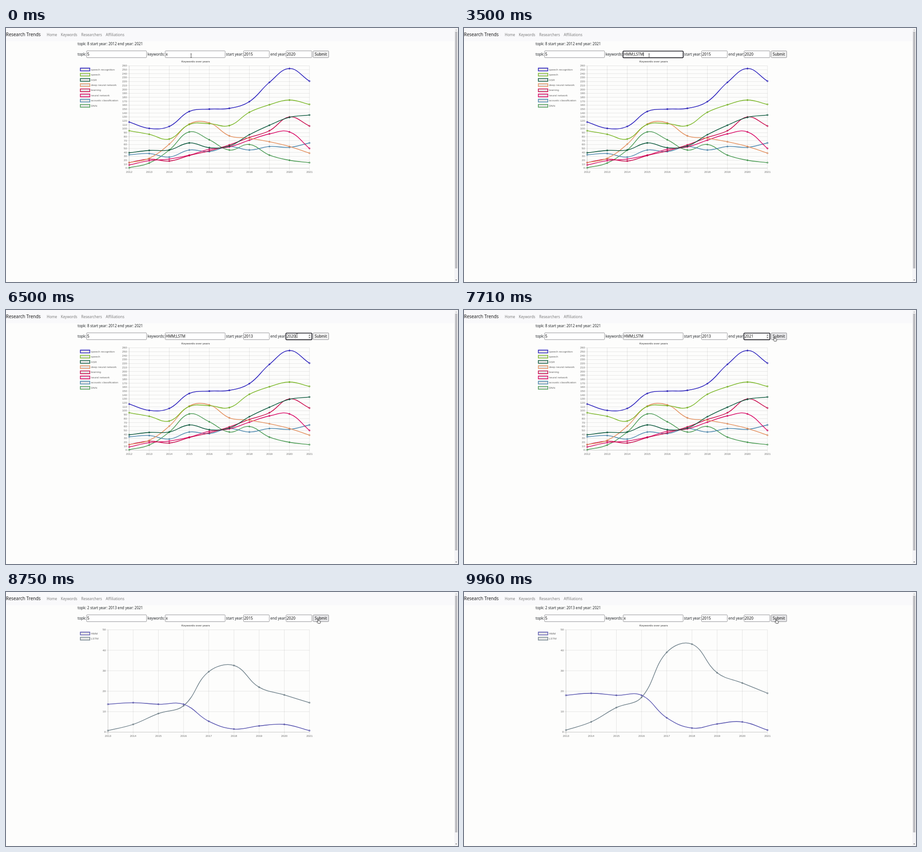
Write an HTML page with a canvas that moves like this. It is 998 px wide and 561 px high and loops after 10 s.

```html
<!DOCTYPE html>
<html lang="en">
<head>
<meta charset="utf-8">
<title>Research Trends</title>
<style>
  html, body { margin: 0; width: 100%; height: 100%; overflow: hidden; background: #fdfdfc; }
  canvas { display: block; }
</style>
</head>
<body>
<canvas id="stage" width="998" height="561"></canvas>
<script>
const ctx = document.getElementById('stage').getContext('2d');
const LOOP = 10000;
const RELOAD = 8380, CHART_IN = 8420, GROW = 1090;
const UI = '"Noto Sans", "Open Sans", sans-serif';
const CHART = '"Liberation Sans", Arial, sans-serif';
const TOP = 83.5, BOTTOM = 309.5, RIGHT = 670.1;

const trends = {
  left: 272, first: 2012, count: 10, max: 260,
  sets: [
    ['speech recognition', '#2a20bd', [117, 101, 106, 144, 150, 152, 169, 218, 253, 221]],
    ['speech', '#7cb829', [95, 86, 74, 111, 113, 108, 142, 161, 173, 162]],
    ['ASR', '#0d5a3e', [39, 45, 46, 64, 52, 56, 85, 109, 129, 135]],
    ['deep neural network', '#e4915f', [14, 25, 61, 112, 115, 82, 76, 67, 55, 38]],
    ['learning', '#c9064a', [14, 23, 18, 32, 44, 59, 78, 95, 130, 107]],
    ['neural network', '#da0a66', [8, 19, 23, 33, 48, 54, 71, 87, 92, 50]],
    ['acoustic classification', '#4a86ad', [34, 37, 28, 46, 42, 55, 46, 55, 53, 64]],
    ['DNN', '#4c9c55', [1, 13, 46, 92, 72, 46, 60, 33, 20, 14]]
  ]
};
const models = {
  left: 225.2, first: 2013, count: 9, max: 50,
  sets: [
    ['HMM', '#5d5ab2', [18, 19, 18, 18, 7, 2, 4, 5, 1]],
    ['LSTM', '#74858e', [1, 5, 12, 17, 39, 43, 29, 24, 19]]
  ]
};

const fields = {
  topk: { x: 177.5, w: 133.3, size: 8.5 },
  keywords: { x: 351, w: 133.3, size: 8.1 },
  start: { x: 524, w: 57.8, size: 8.5, number: true },
  end: { x: 618, w: 57.8, size: 8.5, number: true }
};

// Each edit: time, focused field, its value afterwards.
const edits = [
  [40, 'keywords', 'x'], [630, 'keywords', ''],
  [1500, 'keywords', 'H'], [1700, 'keywords', 'HM'], [2130, 'keywords', 'HMM'],
  [2550, 'keywords', 'HMM;'], [2740, 'keywords', 'HMM;L'], [2920, 'keywords', 'HMM;LS'],
  [3020, 'keywords', 'HMM;LST'], [3120, 'keywords', 'HMM;LSTM'],
  [4590, 'start', '2015'], [4960, 'start', '201'], [5380, 'start', '2013'],
  [6040, 'end', '2020'], [6620, 'end', '202'], [7000, 'end', '2021'],
  [8000, null, '']
];

// Pointer moves: start, end, x, y at the end.
const moves = [
  [3710, 4500, 557, 56.5],
  [5750, 6040, 642.5, 56.5],
  [7290, 7800, 690, 61]
];

function text(s, x, y, size, color, { font = UI, align = 'left', weight = 400, base = 'alphabetic' } = {}) {
  ctx.font = `${weight} ${size}px ${font}`;
  ctx.textAlign = align;
  ctx.textBaseline = base;
  ctx.fillStyle = color;
  ctx.fillText(s, x, y);
}

function label(s, x, y, align, weight) {
  text(s, x, y, 6.25, '#666', { font: CHART, align, weight, base: 'middle' });
}

function line(x1, y1, x2, y2, color, width = 1) {
  ctx.strokeStyle = color;
  ctx.lineWidth = width;
  ctx.beginPath();
  ctx.moveTo(x1, y1);
  ctx.lineTo(x2, y2);
  ctx.stroke();
}

function box(x, y, w, h, fill, stroke, width, radius = 0) {
  ctx.beginPath();
  ctx.roundRect(x, y, w, h, radius);
  ctx.fillStyle = fill;
  ctx.fill();
  ctx.strokeStyle = stroke;
  ctx.lineWidth = width;
  ctx.stroke();
}

function triangle(x, y, w, h, color) {
  ctx.fillStyle = color;
  ctx.beginPath();
  ctx.moveTo(x - w, y);
  ctx.lineTo(x + w, y);
  ctx.lineTo(x, y + h);
  ctx.fill();
}

function controls(points) {
  const clamp = y => Math.min(BOTTOM, Math.max(TOP, y));
  return points.map((p, i) => {
    const a = points[i - 1] || p, b = points[i + 1] || p;
    const da = Math.hypot(p.x - a.x, p.y - a.y), db = Math.hypot(b.x - p.x, b.y - p.y);
    const fa = 0.4 * da / (da + db), fb = 0.4 * db / (da + db);
    const dx = b.x - a.x, dy = b.y - a.y;
    return {
      ax: p.x - fa * dx, ay: clamp(p.y - fa * dy),
      bx: p.x + fb * dx, by: clamp(p.y + fb * dy)
    };
  });
}

function drawSeries(chart, [, color, values], grow) {
  const step = (RIGHT - chart.left) / (chart.count - 1);
  const points = values.map((v, i) => ({
    x: chart.left + i * step,
    y: BOTTOM - v / chart.max * (BOTTOM - TOP)
  }));
  const cps = controls(points);
  const rise = y => BOTTOM + (y - BOTTOM) * grow;
  ctx.strokeStyle = color;
  ctx.lineWidth = 1.56;
  ctx.beginPath();
  points.forEach((p, i) => {
    if (!i) return ctx.moveTo(p.x, rise(p.y));
    const a = cps[i - 1], b = cps[i];
    ctx.bezierCurveTo(a.bx, rise(a.by), b.ax, rise(b.ay), p.x, rise(p.y));
  });
  ctx.stroke();
  ctx.lineWidth = 0.9;
  ctx.fillStyle = 'rgba(0,0,0,.1)';
  for (const p of points) {
    ctx.beginPath();
    ctx.arc(p.x, rise(p.y), 1.56, 0, Math.PI * 2);
    ctx.fill();
    ctx.stroke();
  }
}

function drawChart(chart, grow) {
  const { left, count, max, sets } = chart;
  label('Keywords over years', 418.7, 74.6, 'center', 700);
  sets.forEach(([name, color], i) => {
    const y = 91.7 + i * 11.46;
    box(164.2, y - 3.1, 20.8, 6.2, '#e6e6e6', color, 1.56);
    label(name, 187.6, y + 0.2);
  });
  const grid = 'rgba(0,0,0,.11)', axis = 'rgba(0,0,0,.26)';
  for (let i = 0; i < count; i++) {
    const x = left + i * (RIGHT - left) / (count - 1);
    line(x, TOP, x, BOTTOM + 5, i ? grid : axis, 0.9);
    label(chart.first + i, x, 318.4, 'center');
  }
  for (let v = 0; v <= max; v += 10) {
    const y = BOTTOM - v / max * (BOTTOM - TOP);
    line(left - 4.5, y, RIGHT, y, v ? grid : axis, 0.9);
    label(v, left - 5, y + 0.2, 'right');
  }
  for (const set of [...sets].reverse()) drawSeries(chart, set, grow);
}

function drawField(name, value, focused, hovered, caret) {
  const { x, w, size, number } = fields[name];
  if (focused) box(x + 0.1, 51, w - 0.5, 14.7, '#fff', '#14141c', 1.7, 1.5);
  else box(x + 0.5, 50.5, w - 1, 15, '#fff', '#85858a', 0.9, 1);
  text(value, x + 1.7, 61, size, '#111');
  if (focused && caret) {
    const cx = x + 2.2 + ctx.measureText(value).width;
    line(cx, 53.5, cx, 62.5, '#111', 0.8);
  }
  if (number && (focused || hovered)) {
    ctx.fillStyle = '#ececec';
    ctx.fillRect(x + w - 8.5, 52.5, 6, 11);
    triangle(x + w - 5.6, 56.5, 1.7, -2, '#444');
    triangle(x + w - 5.6, 60, 1.7, 2, '#444');
  }
}

function pointerAt(t) {
  let x = 408.7, y = 61.2;
  for (const [from, to, nx, ny] of moves) {
    const p = Math.min(1, Math.max(0, (t - from) / (to - from)));
    const e = p * p * (3 - 2 * p);
    x += (nx - x) * e;
    y += (ny - y) * e;
  }
  return { x, y };
}

function drawBeam({ x, y }) {
  line(x, y - 4, x, y + 4, '#333', 0.9);
  line(x - 1.6, y - 4.2, x + 1.6, y - 4.2, '#333', 0.8);
  line(x - 1.6, y + 4.2, x + 1.6, y + 4.2, '#333', 0.8);
}

function drawHand({ x, y }) {
  ctx.save();
  ctx.translate(x, y);
  ctx.lineJoin = 'round';
  ctx.beginPath();
  ctx.moveTo(-1.6, 4.6);
  ctx.lineTo(-1.6, -0.6);
  ctx.quadraticCurveTo(-0.7, -1.9, 0.2, -0.6);
  ctx.lineTo(0.2, 2.6);
  ctx.lineTo(3.6, 3.2);
  ctx.quadraticCurveTo(4.8, 3.6, 4.6, 5);
  ctx.lineTo(3.6, 8.2);
  ctx.lineTo(-1.2, 8.2);
  ctx.lineTo(-4, 4.8);
  ctx.quadraticCurveTo(-3.8, 3.4, -1.6, 4.6);
  ctx.fillStyle = '#fff';
  ctx.fill();
  ctx.strokeStyle = '#222';
  ctx.lineWidth = 0.9;
  ctx.stroke();
  ctx.restore();
}

function drawFrame() {
  ctx.fillStyle = '#fdfdfc';
  ctx.fillRect(0, 0, 998, 561);
  ctx.fillStyle = '#f9f9fb';
  ctx.fillRect(0, 0, 990, 29);
  text('Research Trends', 0, 18.4, 9.93, '#1b1b1b');
  text('Home', 90, 18, 8, '#7c7c7c');
  text('Keywords', 121, 18, 8, '#7c7c7c');
  text('Researchers', 166, 18, 8, '#7c7c7c');
  text('Affiliations', 220.3, 18, 8.25, '#7c7c7c');

  ctx.fillStyle = '#f4f4f6';
  ctx.fillRect(990, 0, 8, 561);
  ctx.fillStyle = '#bcbcc0';
  ctx.fillRect(991.5, 8, 5, 523);
  triangle(994, 5.2, 1.8, -2, '#a0a0a0');
  triangle(994, 555.8, 1.8, 2, '#505050');
}

function draw(t) {
  const loaded = t >= RELOAD;
  const values = { topk: '5', keywords: 'x', start: '2015', end: '2020' };
  let focus = null, since = 0;
  if (!loaded) {
    for (const [at, name, value] of edits) {
      if (t < at) break;
      focus = name;
      since = at;
      if (name) values[name] = value;
    }
  }
  const caret = Math.floor((t - since) / 585) % 2 === 0;
  const mouse = pointerAt(t);
  const over = (x, w) => mouse.x >= x && mouse.x <= x + w;
  const onButton = over(678, 34);

  drawFrame();
  text(`topk: ${loaded ? 2 : 8} start year: ${loaded ? 2013 : 2012} end year: 2021`, 158, 38.4, 8.04, '#212529');
  text('topk:', 158, 61, 8.05, '#212529');
  text('keywords:', 312.5, 61, 8, '#212529');
  text('start year:', 485.8, 61, 8, '#212529');
  text('end year:', 583.7, 61, 8, '#212529');
  for (const name in fields) {
    const f = fields[name];
    drawField(name, values[name], focus === name, over(f.x, f.w), caret);
  }
  box(678, 50.5, 34.5, 15, onButton ? '#e4e4e6' : '#efefef', '#85858a', 0.9, 1.5);
  text('Submit', 695.2, 61, 8, '#111', { align: 'center' });

  if (!loaded) drawChart(trends, 1);
  else if (t >= CHART_IN) {
    const p = Math.min(1, Math.max(0, (t - CHART_IN - 5) / GROW));
    drawChart(models, 1 - (1 - p) ** 4);
  }
  if (onButton) drawHand(mouse);
  else drawBeam(mouse);
}

let begin = null;
function tick(now) {
  if (begin === null) begin = now;
  draw((now - begin) % LOOP);
  requestAnimationFrame(tick);
}
draw(0);
requestAnimationFrame(tick);
</script>
</body>
</html>
```
